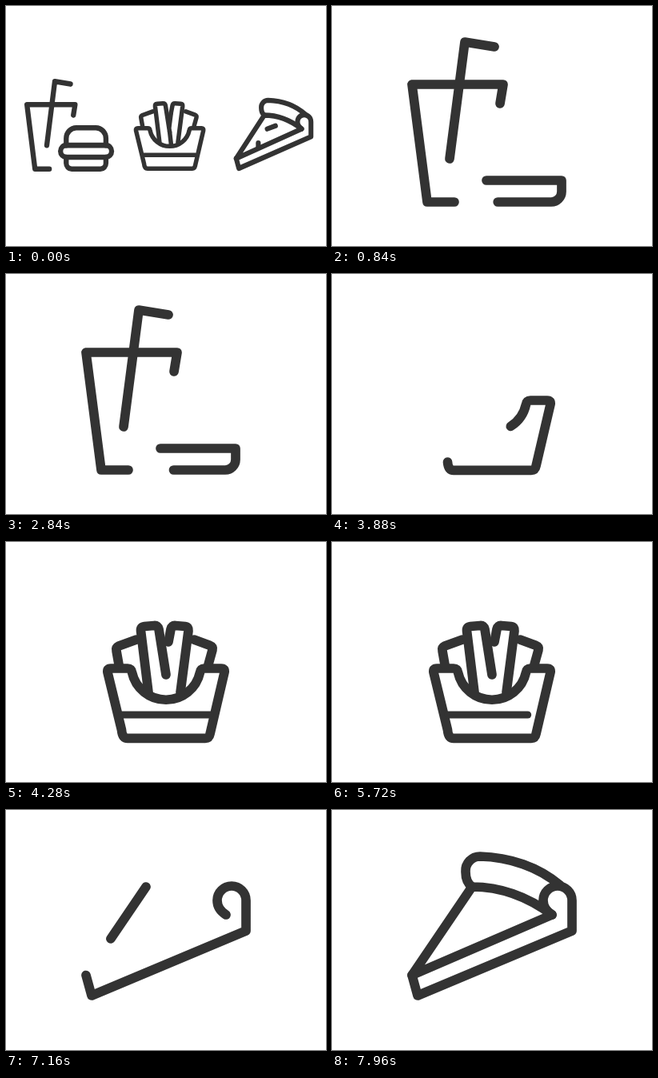
An HTML page that plays this animation: 400x300 px, repeating every 8 s.

```html
<!DOCTYPE html>
<html lang="en">
<head>
<meta charset="utf-8">
<style>
  html, body { margin: 0; width: 100%; height: 100%; overflow: hidden; background: #fff; }
  svg { display: block; width: 100%; height: 100%; }
  path { fill: none; stroke: #333; stroke-width: 11.7; stroke-linecap: round; stroke-linejoin: round; }
</style>
</head>
<body>
<svg id="stage" viewBox="0 0 400 300"></svg>
<script>
const LOOP = 8000, INTRO = 40;
const stage = document.getElementById('stage');

// Strokes are drawn one after another and taken back in reverse order.
// mini: x, y, scale x, scale y of the small icon; reach: share of the full run covered by the strokes.
const icons = [
  {
    start: 0, draw: 1400, erase: 2280, mini: [23, 91, .528, .547], origin: [94, 39], miniWidth: 12,
    strokes: [
      'M153 245H119L100 98H214L210 122',
      'M147 191L166 45L203 51',
      'M193 218H287V232A13 13 0 0 1 274 245H206A13 13 0 0 1 193 232Z',
      'M193 218A13.5 13.5 0 0 1 193 191H287A13.5 13.5 0 0 1 287 218',
      'M193 191V175A24 24 0 0 1 217 151H263A24 24 0 0 1 287 175V191'
    ]
  },
  {
    start: 3660, draw: 620, erase: 5680, mini: [159, 118, .577, .578], origin: [121, 98], miniWidth: 9.5,
    strokes: [
      'M144.5 235C145 241 147 245.3 152 245.3H249Q254 245.3 255 240L273 163Q274 158 269 158H248Q243 158 242.5 163' +
        'A43.5 43.5 0 0 1 157.5 163Q157 158 152 158H131Q126 158 127 163L144.5 235',
      'M141 153L138 136Q137 132 141 130L163 122',
      'M235 122L254 129Q259 131 258 135L253 153',
      'M178 188L168.5 111Q168 106 173 105.5L185 104.5Q190 104 191 109L200 166',
      'M218 188L228 111Q228.5 106 224 105.5L212 104.5Q207 104 206 109L203 125',
      'M145 216H255'
    ],
    thin: 5,
    extras: ['M200 166L203 192', 'M203 125L199 155']
  },
  {
    start: 6280, draw: 1905, erase: Infinity, reach: .966, mini: [285, 115, .467, .489], origin: [94, 52], miniWidth: 13,
    strokes: [
      'M100 206.5L107 232L300 151V113A18 18 0 0 0 264 113Q264 124 275 131',
      'M175 96L100 206.5L275 131Q228 96 175 96',
      'M175 96C168 91 167 84 167 77A18 18 0 0 1 185 58C222 59 258 71 285 94'
    ],
    extras: ['M183 131L205 123', 'M159 167V179']
  }
];

function add(parent, tag, attributes) {
  const node = document.createElementNS('http://www.w3.org/2000/svg', tag);
  for (const name in attributes) node.setAttribute(name, attributes[name]);
  return parent.appendChild(node);
}

const miniatures = add(stage, 'g', {});

for (const icon of icons) {
  const [x, y, sx, sy] = icon.mini, [ox, oy] = icon.origin;
  const mini = add(miniatures, 'g', {
    transform: `translate(${x} ${y}) scale(${sx} ${sy}) translate(${-ox} ${-oy})`
  });
  for (const d of [...icon.strokes, ...(icon.extras || [])])
    add(mini, 'path', { d, style: `stroke-width:${icon.miniWidth}` });

  icon.parts = icon.strokes.map((d, i) => {
    const node = add(stage, 'path', { d, style: i === icon.thin ? 'stroke-width:9' : '' });
    return { node, length: node.getTotalLength() };
  });
  icon.total = icon.parts.reduce((sum, part) => sum + part.length, 0) / (icon.reach || 1);
}

const clamp = u => Math.min(1, Math.max(0, u));
const ease = u => (1 - Math.cos(Math.PI * clamp(u))) / 2;

function trim(icon, t) {
  const shown = ease((t - icon.start) / icon.draw) - ease((t - icon.erase) / icon.draw);
  let left = shown * icon.total;
  for (const { node, length } of icon.parts) {
    const visible = t >= INTRO && left > .05;
    node.style.display = visible ? '' : 'none';
    if (visible) node.style.strokeDasharray = left >= length ? 'none' : `${left} 9999`;
    left -= length;
  }
}

function render(t) {
  miniatures.style.display = t < INTRO ? '' : 'none';
  for (const icon of icons) trim(icon, t);
}

const began = performance.now();
function tick() {
  render((performance.now() - began) % LOOP);
  requestAnimationFrame(tick);
}
render(0);
requestAnimationFrame(tick);
</script>
</body>
</html>
```
